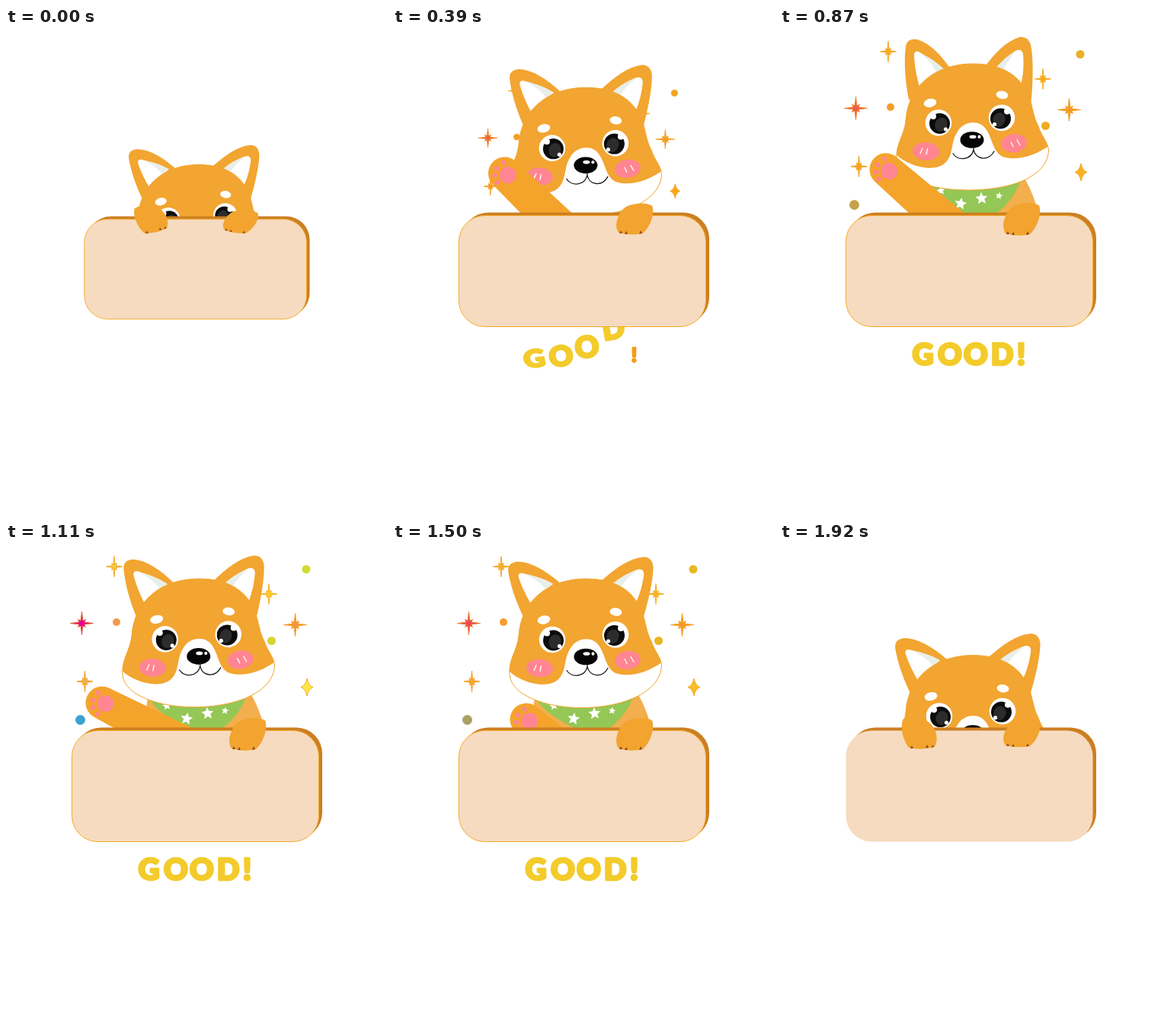
These frames come from a looping animation (500 px wide and 640 px high, 1.95 s). An HTML page with a canvas:

```html
<!DOCTYPE html>
<html lang="en">
<head>
<meta charset="utf-8">
<title>Good dog</title>
<style>
html, body { margin: 0; width: 100%; height: 100%; overflow: hidden; background: #fff; }
canvas { display: block; width: 500px; height: 640px; }
</style>
</head>
<body>
<canvas id="stage" width="500" height="640"></canvas>
<script>
const g = document.getElementById('stage').getContext('2d');
const LOOP = 1950, STEP = 30, RAD = Math.PI / 180;
const COAT = '#f2a530', BODY = '#f3ae4d', PINK = '#ff8592', CLAW = '#8c4a17', EDGE = '#f5ab26';

const clamp = v => Math.max(0, Math.min(1, v));
const part = (t, a, b) => clamp((t - a) / (b - a));
const smooth = u => 0.5 - 0.5 * Math.cos(Math.PI * u);
const mix = (a, b, u) => a + (b - a) * u;

// Eased value through [time, value] stops.
function track(t, stops) {
  if (t <= stops[0][0]) return stops[0][1];
  for (let i = 1; i < stops.length; i++) {
    const [a, va] = stops[i - 1], [b, vb] = stops[i];
    if (t <= b) return mix(va, vb, smooth((t - a) / (b - a)));
  }
  return stops[stops.length - 1][1];
}

function blend(a, b, u) {
  const ch = (h, i) => parseInt(h.slice(i, i + 2), 16);
  return 'rgb(' + [1, 3, 5].map(i => Math.round(mix(ch(a, i), ch(b, i), u))).join() + ')';
}

function shape(d, fill, line, width = 1) {
  const p = new Path2D(d);
  if (fill) { g.fillStyle = fill; g.fill(p); }
  if (line) { g.strokeStyle = line; g.lineWidth = width; g.stroke(p); }
}

function oval(x, y, rx, ry, fill, turn = 0) {
  g.beginPath();
  g.ellipse(x, y, rx, ry, turn * RAD, 0, 7);
  g.fillStyle = fill;
  g.fill();
}

const disc = (x, y, r, fill) => oval(x, y, r, r, fill);

function group(draw) { g.save(); draw(); g.restore(); }

function spin(x, y, deg) {
  g.translate(x, y);
  g.rotate(deg * RAD);
  g.translate(-x, -y);
}

function star5(x, y, r, turn) {
  g.beginPath();
  for (let i = 0; i < 10; i++) {
    const a = (turn - 90 + i * 36) * RAD, q = i % 2 ? r * 0.45 : r;
    g.lineTo(x + q * Math.cos(a), y + q * Math.sin(a));
  }
  g.fillStyle = '#fff';
  g.fill();
}

function burst(x, y, rx, ry, fill, tip) {
  g.beginPath();
  for (let i = 0; i < 16; i++) {
    const a = i * Math.PI / 8;
    const k = i % 4 === 0 ? 1 : i % 2 ? 0.24 : 0.46;
    g.lineTo(x + rx * k * Math.cos(a), y + ry * k * Math.sin(a));
  }
  g.closePath();
  const paint = g.createRadialGradient(x, y, 2, x, y, ry);
  paint.addColorStop(0, fill);
  paint.addColorStop(1, tip);
  g.fillStyle = paint;
  g.fill();
  g.lineJoin = 'round';
  g.lineWidth = 0.9;
  g.strokeStyle = tip;
  g.stroke();
}

function diamond(x, y, rx, ry, fill) {
  shape(`M${x} ${y - ry}Q${x + 2} ${y - 2} ${x + rx} ${y}Q${x + 2} ${y + 2} ${x} ${y + ry}` +
    `Q${x - 2} ${y + 2} ${x - rx} ${y}Q${x - 2} ${y - 2} ${x} ${y - ry}Z`, fill, EDGE);
}

function sparkles(t) {
  const k = Math.sin(part(t, 140, 540) * Math.PI / 2) * (1 - smooth(part(t, 1650, 1890)));
  if (k < 0.01) return;
  const q = track(t, [[0, 0], [390, 0.1], [630, 0.6], [870, 0.25], [1110, 1], [1500, 0.4], [1950, 0]]);
  const hue = c => blend('#f5a01a', c, q);
  group(() => {
    g.translate(248, 337);
    g.scale(k, k);
    g.translate(-248, -337);
    burst(99.5, 105.5, 15, 15, blend('#f2762e', '#e6009a', q), blend('#f08a1e', '#e05030', q));
    burst(379.5, 107.5, 15, 15, hue('#f29440'), '#f59a1c');
    burst(142, 31, 10.5, 13.5, hue('#f4c83c'), '#f3a41c');
    burst(345, 67, 10.5, 13.5, hue('#ffd020'), '#f7ab1a');
    burst(103.5, 182, 10.5, 14, hue('#efb050'), '#f39e1c');
    diamond(395, 189.5, 8, 11.5, hue('#ffe540'));
    disc(394, 34.5, 5.5, hue('#cfdc38'));
    disc(145, 104, 5, hue('#f29a4c'));
    disc(348.5, 128.5, 5.5, hue('#d6d532'));
    disc(97.5, 232.5, 6.5, hue('#3ca2d2'));
  });
}

function letters(t) {
  g.font = '900 39px Lato, Inter, "Open Sans", sans-serif';
  g.textAlign = 'center';
  g.lineJoin = 'round';
  const put = (ch, x, foot, turn, sx, sy, fill) => group(() => {
    g.translate(x, foot);
    g.scale(sx, sy);
    g.rotate(turn * RAD);
    g.fillStyle = g.strokeStyle = fill;
    g.lineWidth = 2.6;
    g.strokeText(ch, 0, -1.2);
    g.fillText(ch, 0, -1.2);
  });
  [['G', 187.5], ['O', 223], ['O', 257], ['D', 291.5]].forEach(([ch, x], i) => {
    const u = part(t, 244 + 41 * i, 504 + 41 * i), v = part(t, 1650 + 25 * i, 1800 + 25 * i);
    if (u <= 0 || v >= 1) return;
    const w = u - 1, rise = 1 + 2.7 * w ** 3 + 1.7 * w * w;
    // A letter that drops past its line is flattened against it.
    const over = Math.max(0, rise - 1);
    const foot = 444.5 - 55 * Math.max(0, 1 - rise) + 20 * over - 60 * v * v;
    put(ch, x, foot, -10 * Math.min(1, 2 * (1 - u)), 1, 1 - 1.9 * over, '#f3cb2b');
  });
  const pop = part(t, 300, 430) * (1 - part(t, 1740, 1860));
  if (pop > 0) put('!', 316.5, 430 + 14.5 * pop, 0, pop, pop, blend('#f59c12', '#f3cb2b', part(t, 390, 520)));
}

function ears(e) {
  group(() => {
    g.translate(2 * e, 4 * e);
    spin(190, 85, -16 * e);
    shape('M169 94C163 65 163 40 165 24Q167 13 180 15C197 20 212 36 226 57L182 98Z', COAT);
    shape('M176 34Q178 28 185 33C200 41 208 47 217 56Q196 64 184 80C179 65 176 45 176 34Z', '#fff');
    shape('M184 33C200 41 208 47 217 56L206 60C201 49 193 40 184 33Z', '#e8eee9');
  });
  group(() => {
    g.translate(e, 3 * e);
    spin(305, 80, 12 * e);
    shape('M329 102C332 75 333 40 329 22Q325 10 314 12C296 18 282 33 267 53L300 92Z', COAT);
    shape('M319 34Q317 26 309 30C297 38 288 46 281 56Q303 62 316 75C320 60 320 45 319 34Z', '#fff');
    shape('M310 30C297 38 288 46 281 56L292 59C296 48 302 39 310 30Z', '#e8eee9');
  });
}

function eye(x, y, side) {
  disc(x, y, 17.3, '#fff');
  disc(x - side * 1.5, y + 1, 13.5, '#0c0c0c');
  oval(x - side * 3.5, y + 2.5, 8, 9.5, '#2c2c2c', 20);
  disc(x + side * 7, y - 8.5, 4, '#fff');
  disc(x - side * 9.5, y + 8.5, 2.6, '#fff');
}

function head(e) {
  const chin = 213 + 3.5 * e;
  const skull = 'M253 47C205 47 168 75 165 122C163 142 151 153 153 174' +
    `C156 200 200 ${chin} 247 ${chin}C300 ${chin} 351 197 352.5 161` +
    'C352 150 343 142 339 129C334 120 333 112 331 105C324 70 300 47 253 47Z';
  shape(skull, COAT);
  group(() => {
    g.clip(new Path2D(skull));
    g.translate(0, 2 * e);
    shape('M150 164C165 181 200 191 216 178C228 168 224 150 232 138C240 121 263 120 271 134' +
      'C279 146 279 162 292 169C312 176 338 166 354 154V225H150Z', '#fff');
  });
  shape(skull, null, COAT);
  g.save();
  g.translate(e, 2.5 * e);
  oval(197, 98.5, 8.5, 5.5, '#fff', -12);
  oval(291.5, 88, 8, 5.2, '#fff', 8);
  eye(208, 124.5, -1);
  eye(291, 118, 1);
  oval(191.5, 162, 17.5, 11.8, PINK, 4);
  oval(307, 151.5, 17, 12, PINK, -8);
  g.lineCap = 'round';
  shape('M184 165L187 158M192 166L193.500 159M303 150L306 156M311 147L315 154', null, '#fff', 1.3);
  oval(252, 147, 15.5, 10.8, '#050505');
  oval(253, 143, 4.5, 2.3, '#fff');
  oval(261.5, 143, 2, 2.2, '#fff');
  shape('M254 156V160C251 174 233 175 227 165M254 160C257 174 274 175 281 162', null, '#1b1b1b', 1.3);
  g.restore();
}

function torso() {
  shape('M188 196C183 215 180 245 180 290H345C343 245 334 220 318 192Z', BODY);
  shape('M187 203C220 215 285 216 317 197C312 215 298 234 282 245Q260 254 238 243C215 232 194 218 187 203Z', '#94c755');
  star5(211, 214, 6, -8);
  star5(237, 231, 8.5, 10);
  star5(264.5, 224, 8.5, -5);
  star5(287.5, 220.5, 5, 10);
}

function arm(t) {
  if (t < 150 || t > 1640) return;
  const ends = [150, 390, 630, 870, 1110, 1350, 1500, 1640];
  const at = vals => track(t, vals.map((v, i) => [ends[i], v]));
  const x = at([190, 146.5, 124, 139, 126, 139, 175, 190]);
  const y = at([272, 191, 213, 186, 210, 187, 232, 272]);
  const a = at([48, 42, 24, 39, 25, 39, 38, 45]);
  group(() => {
    g.translate(x, y);
    g.rotate(a * RAD);
    shape('M0 -21.500A21.500 21.500 0 0 0 0 21.500L130 30V-20Z', '#f4a42b');
    disc(4.5, -1, 11, PINK);
    for (const d of [30, -10, -43, -77]) {
      oval(4.5 - 17 * Math.cos(d * RAD), -1 - 17 * Math.sin(d * RAD), 3.6, 2.8, PINK, d);
    }
  });
}

function slab(x, y, fill, line) {
  g.beginPath();
  g.roundRect(x, y, 324, 146, 34);
  g.fillStyle = fill;
  g.fill();
  if (line) { g.strokeStyle = line; g.lineWidth = 1; g.stroke(); }
}

function board(t) {
  slab(91, 242.5, '#cc7f22');
  slab(86.5, 246.5, '#f6dbc0', t < 1890 ? EDGE : null);
}

function paws(t, low) {
  const tilt = 1 - part(t, 0, 150);
  group(() => {
    g.translate(317 - 2 * tilt, 243);
    g.scale(1, 1 - 0.18 * low);
    g.translate(-317, -243);
    spin(317, 245, 9 * tilt);
    shape('M300 240C306 230 330 227 340 233C344 243 338 262 328 271Q312 275 296 270C290 262 294 248 300 240Z', '#f2a42f');
    shape('M297 271L299 267L301 271ZM304 272L306 268L308 272ZM323 272L325 267L327 271Z', CLAW);
  });
  const show = Math.max(1 - part(t, 120, 210), part(t, 1620, 1710));
  if (show <= 0) return;
  group(() => {
    g.translate(182, 250 - 4 * tilt);
    g.scale(show, show);
    g.translate(-182, -250);
    spin(182, 245, -11 * tilt);
    shape('M162 231C157 240 161 259 169 269Q185 273 203 268C208 258 206 247 198 238C188 228 170 227 162 231Z', '#f2a42f');
    shape('M171 270L173 266L175 270ZM191 269L193 265L195 269ZM199 269L200 265L202 268Z', CLAW);
  });
}

function render(t) {
  const zoom = track(t, [[0, 0.9], [150, 1.033], [300, 1]]);
  const dy = 120 * (1 - smooth(part(t, 100, 540)) + part(t, 1620, 1950) ** 1.85);
  const e = track(t, [[240, 1], [390, 0.85], [570, 0], [870, 0], [1110, 0.75], [1500, 1]]);
  g.clearRect(0, 0, 500, 640);
  group(() => {
    g.translate(250, 293);
    g.scale(zoom, zoom);
    g.translate(-250, -293);
    sparkles(t);
    letters(t);
    // Everything of the dog that stands behind the board ends at its middle.
    group(() => {
      g.beginPath();
      g.rect(0, -50, 500, 370);
      g.clip();
      group(() => {
        g.translate(0, dy);
        torso();
        ears(e);
        head(e);
      });
      arm(t);
    });
    board(t);
    paws(t, dy / 120);
  });
}

const begin = performance.now();
function tick() {
  const t = (performance.now() - begin) % LOOP;
  render(Math.floor(t / STEP) * STEP);
  requestAnimationFrame(tick);
}
tick();
</script>
</body>
</html>
```
